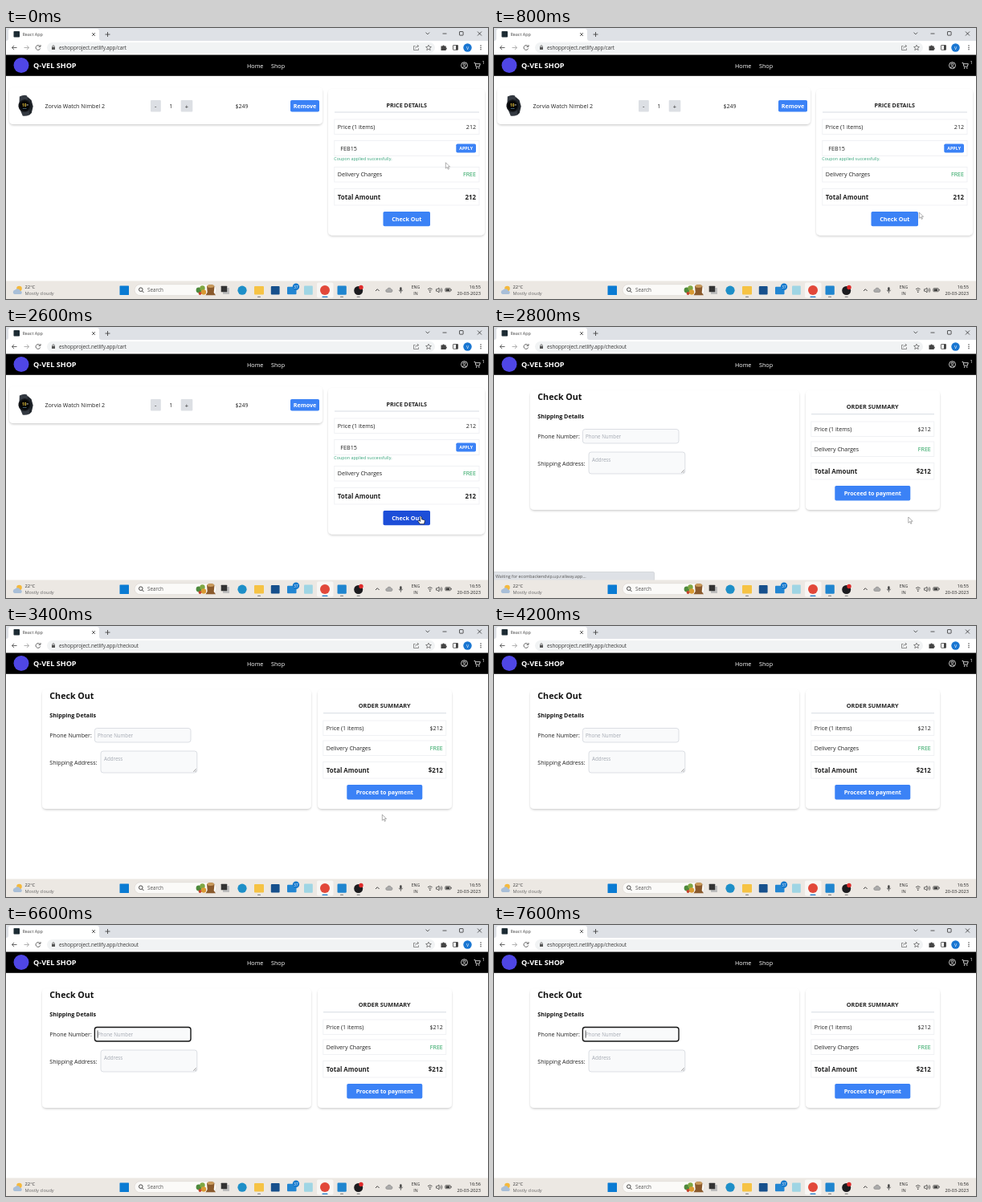
These frames come from a looping animation (600x338 px, 8 s). An HTML page:

```html
<!DOCTYPE html>
<html lang="en">
<head>
<meta charset="utf-8">
<title>Shop checkout</title>
<style>
html, body { margin: 0; width: 100%; height: 100%; overflow: hidden; background: #fff; }
svg { display: block; width: 100vw; height: 100vh; font-family: "Open Sans", "Noto Sans", sans-serif; }
</style>
</head>
<body>
<svg id="stage" viewBox="0 0 600 338" xmlns="http://www.w3.org/2000/svg"></svg>
<script>
const LOOP = 8000;
const BLUE = '#3b82f6', HOVER = '#1d4ed8', INK = '#222', GREEN = '#22a05a';

// Markup helpers
const rect = (x, y, w, h, fill, r = 0, extra = '') =>
  `<rect x="${x}" y="${y}" width="${w}" height="${h}" rx="${r}" fill="${fill}" ${extra}/>`;
const circle = (x, y, r, fill, extra = '') => `<circle cx="${x}" cy="${y}" r="${r}" fill="${fill}" ${extra}/>`;
const line = (d, stroke = '#444', w = 0.8, extra = '') =>
  `<path d="${d}" fill="none" stroke="${stroke}" stroke-width="${w}" ${extra}/>`;
const shape = (d, fill, extra = '') => `<path d="${d}" fill="${fill}" ${extra}/>`;
const text = (s, x, y, size = 7.1, fill = INK, extra = '') =>
  `<text x="${x}" y="${y}" font-size="${size}" fill="${fill}" ${extra}>${s}</text>`;
const BOLD = 'font-weight="700"', MID = 'text-anchor="middle"', END = 'text-anchor="end"';
const group = (id, body) => `<g id="${id}">${body}</g>`;

const card = (x, y, w, h) => rect(x, y, w, h, '#fff', 5, 'filter="url(#shadow)"');
const button = (x, y, w, h, label, size = 7.2, id = '') =>
  rect(x, y, w, h, BLUE, 1.8, id && `id="${id}"`) +
  text(label, x + w / 2, y + h / 2 + size * 0.36, size, '#fff', `${BOLD} ${MID}`);

function row(x, y, w, h, label, value, { size = 7.1, style = '', color = INK } = {}) {
  const base = y + h / 2 + size * 0.37;
  return rect(x, y, w, h, '#fff', 0, 'stroke="#eff0f3" stroke-width=".9"') +
    text(label, x + 4, base, size, INK, style) +
    text(value, x + w - 4, base, size, color, `${END} ${style}`);
}
const total = { size: 7.9, style: BOLD };

function browser() {
  return rect(0, 0, 600, 16, '#dee1e6') +
    shape('M0 16Q3 16 3 13V4Q3 1 6 1H113Q116 1 116 4V13Q116 16 119 16Z', '#fff') +
    rect(9.5, 4, 7.5, 7.5, '#1c2b33', 0.8) +
    text('React App', 20.5, 10.1, 5.4, '#444') +
    line('M107 6l4 4m0-4l-4 4', '#444', 0.8) +
    line('M123.5 8h6m-3-3v6', '#444', 0.9) +
    line('M522.5 5.6l2.3 2.3 2.3-2.3M543.5 7h5M587 4.5l5 5m0-5l-5 5', '#333', 0.8) +
    rect(564.5, 4.5, 4.6, 4.6, 'none', 0.5, 'stroke="#333" stroke-width=".8"') +
    rect(0, 16, 600, 17.5, '#fff') +
    line('M13.5 24.5h-6m2.6-2.6l-2.6 2.6 2.6 2.6', '#555', 0.9) +
    line('M22.5 24.5h6m-2.6-2.6l2.6 2.6-2.6 2.6', '#aaa', 0.9) +
    line('M42.3 22.8a2.9 2.9 0 1 0 .4 2.6M43 21v2.4h-2.4', '#555', 0.9) +
    rect(51, 18, 483, 13, '#f1f3f4', 6.5) +
    rect(57, 23.7, 4, 3.4, '#555', 0.4) + line('M57.8 24v-1.1a1.2 1.2 0 0 1 2.4 0V24', '#555', 0.7) +
    `<text id="url" x="66" y="26.8" font-size="6.25" fill="#333"></text>` +
    line('M509.5 22.5h-2v5h6v-2.2M509.5 25.5q.5-3 4-3m-1.6-1.5l1.8 1.5-1.8 1.6', '#666', 0.7) +
    line('M526 21.2l1 2.2 2.4.2-1.8 1.6.6 2.4-2.2-1.3-2.2 1.3.6-2.4-1.8-1.6 2.4-.2z', '#555', 0.7) +
    shape('M541.5 22.6h2a1.1 1.1 0 0 1 2.2 0h2v2a1.1 1.1 0 0 1 0 2.2v1.2h-6.2z', '#444') +
    rect(556.5, 21.5, 6, 5.8, 'none', 0.4, 'stroke="#444" stroke-width=".8"') + rect(560, 21.5, 2.5, 5.8, '#444') +
    circle(574.5, 24.5, 5.2, '#1976d2') + text('V', 574.5, 26.5, 5.4, '#fff', MID) +
    [22, 24.4, 26.8].map(y => circle(591, y, 0.75, '#444')).join('');
}

function header() {
  return rect(0, 33.5, 600, 26.3, '#000') +
    circle(19, 46.5, 9.5, '#4f46e5') +
    text('Q-VEL SHOP', 34, 50, 9.1, '#fff', BOLD) +
    text('Home', 300, 49.6, 7.2, '#fff') + text('Shop', 330, 49.6, 7.2, '#fff') +
    circle(570.5, 46.7, 4, 'none', 'stroke="#fff" stroke-width=".8"') +
    circle(570.5, 45.5, 1.4, 'none', 'stroke="#fff" stroke-width=".8"') +
    line('M568 49.5q2.5-2.6 5 0', '#fff', 0.8) +
    line('M582.6 43.5h1.4l1 4.6h4.3l1-3.4h-5.8', '#fff', 0.8) +
    circle(585.6, 50, 0.7, '#fff') + circle(588.8, 50, 0.7, '#fff') +
    text('1', 592.4, 45.2, 6, '#fff');
}

function watch() {
  return `<g transform="rotate(-8 24 97)">` +
    shape('M18.5 84.5q5-1.5 9 0l2.5 8v9l-2.5 7.5q-4.500 1.300-8.500 0l-2-8v-8z', '#343a42') +
    shape('M28 86l4.500 5 1 8-3 8-3 2z', '#20252b') +
    circle(23.2, 96.8, 7.8, '#15181c') + circle(23.2, 96.8, 6.2, '#050607') + '</g>' +
    text('10', 20, 98.3, 4.8, '#e8c33a', BOLD) +
    rect(25.8, 95.5, 2, 0.9, '#d7dbe0') + rect(20.8, 100, 4.8, 0.8, '#4a6d86');
}

function cartPage() {
  return card(4, 74, 390, 46) + watch() +
    text('Zorvia Watch Nimbel 2', 48.5, 100.4, 7.1) +
    rect(180, 90, 12.8, 14.5, '#dcdfe4', 1) + rect(217.7, 90, 14.6, 14.5, '#dcdfe4', 1) +
    text('-', 186.2, 100.3, 7.5, INK, MID) + text('1', 205.3, 100.4, 7.1, INK, MID) +
    text('+', 225, 100.6, 7.5, INK, MID) +
    text('$249', 285.5, 100.4, 7) + button(354, 90, 36, 14.5, 'Remove', 7.2) +
    card(401, 76, 195, 182.500) +
    text('PRICE DETAILS', 498.7, 98.6, 7.2, INK, `${BOLD} ${MID}`) +
    line('M409 105H589', '#d3d8e0', 0.9) +
    row(408.8, 114, 180.2, 18.5, 'Price (1 items)', '212') +
    rect(408.8, 140.5, 180.2, 19, '#fff', 0, 'stroke="#eff0f3" stroke-width=".9"') +
    text('FEB15', 416.300, 152.8, 7.2) + button(560.3, 144.500, 24.700, 11, 'APPLY', 5.4) +
    text('Coupon applied successfully.', 408.300, 165.300, 5.4, '#35a37a') +
    row(408.8, 173.5, 180.2, 18.5, 'Delivery Charges', 'FREE', { color: GREEN }) +
    row(408.8, 200.5, 180.2, 20.5, 'Total Amount', '212', total) +
    button(469.500, 229, 58.500, 18.200, 'Check Out', 7.2, 'checkout');
}

function formPage() {
  const field = (x, y, w, h, id) =>
    rect(x, y, w, h, '#f9fafb', 3, `id="${id}" stroke="#d3d7dd" stroke-width=".8"`);
  return card(45, 79, 335, 149) +
    text('Check Out', 54.3, 90.8, 10.7, '#111', BOLD) +
    text('Shipping Details', 54.300, 113.700, 7.2, '#111', BOLD) +
    text('Phone Number:', 54.300, 139.300, 7.1) +
    field(110.400, 127.500, 119.600, 17.500, 'phone') +
    text('Phone Number', 114, 138.900, 6.2, '#a3a8b1') +
    rect(113.700, 131.500, 0.7, 9.300, '#222', 0, 'id="caret"') +
    text('Shipping Address:', 54.300, 172.800, 7.1) +
    field(118, 156, 119.800, 27, 'address') +
    text('Address', 122, 167.900, 6.2, '#a3a8b1') +
    line('M233.200 181.800l3.600-3.600M235.400 181.800l1.400-1.400', '#666', 0.6) +
    card(388, 79, 167, 149) +
    text('ORDER SUMMARY', 471.200, 102.300, 7.350, INK, `${BOLD} ${MID}`) +
    line('M395 108.700H548', '#d3d8e0', 0.9) +
    row(394.800, 118, 153, 18.500, 'Price (1 items)', '$212') +
    row(394.800, 143, 153, 18.500, 'Delivery Charges', 'FREE', { color: GREEN }) +
    row(394.800, 169.500, 153, 20.500, 'Total Amount', '$212', total) +
    button(424.300, 198, 94, 18.500, 'Proceed to payment', 7.1);
}

function taskbar() {
  const under = (x, w = 4, c = '#8a8a8a') => rect(x - w / 2, 334.800, w, 1.2, c, 0.6);
  return rect(0, 315.500, 600, 22.500, '#ece8e3') +
    circle(16.500, 325, 3.300, '#f5b93c') +
    shape('M10.500 332a2.700 2.700 0 0 1 .6-5.200 3.700 3.700 0 0 1 6.600 1 2.200 2.200 0 0 1 .8 4.200z', '#a9bfd8') +
    text('22°C', 23.500, 325.300, 5.800, '#333') + text('Mostly cloudy', 23.500, 332.800, 5.650, '#666') +
    rect(141.500, 321.500, 11.500, 11.500, '#0a7bd3', 0.6) +
    rect(160, 319.700, 102, 14, '#fbfaf8', 7, 'stroke="#d8d4cf" stroke-width=".6"') +
    circle(167.800, 326.200, 2.300, 'none', 'stroke="#333" stroke-width=".9"') + line('M169.500 328l2 2', '#333', 0.9) +
    text('Search', 176, 329.300, 6.300, '#555') +
    // search illustration: foliage beside a stump
    circle(240, 327, 3.400, '#4e8a3c') + circle(244.500, 324.500, 3.200, '#7fa843') +
    circle(246, 329.500, 3.200, '#d99a32') + circle(241.500, 331, 1.900, '#c5432e') +
    shape('M250 322q5-4 9.500 0l-.8 8 2.300 3.200h-12.500l2.200-3.500z', '#8a5a2c') +
    '<ellipse cx="254.700" cy="322" rx="4.300" ry="1.900" fill="#c99a5b"/>' +
    rect(270, 324, 8, 8, '#bdbdbd', 0.5) + rect(267.700, 321.800, 7.500, 7.500, '#333', 0.5) +
    circle(294, 327.200, 5.600, '#1e8fc8') +
    rect(309, 322, 12, 10.500, '#f6c344', 1) + under(315) +
    rect(329.800, 322, 10.800, 10.500, '#17508c', 1) +
    rect(350, 322.800, 11.500, 9.500, '#2386d2', 1) +
    circle(361, 322.700, 4.200, '#1478cd') + text('37', 361, 324.500, 4.600, '#fff', MID) +
    rect(371, 321.500, 10.800, 11.300, '#9fd5e4', 1) +
    rect(387, 317.500, 20.500, 19, '#f8f6f3', 2) + circle(397, 327, 6, '#e2483a') + under(397, 7, '#1672c4') +
    rect(412.500, 321.500, 11.300, 11.300, '#1f85cf', 1.200) + under(418) +
    circle(438.700, 327.500, 5.500, '#1c1c1f') + circle(442, 323.500, 2.700, '#e02b2b') + under(438.700) +
    line('M460 328l2.300-2.300 2.300 2.300', '#333', 0.9) +
    shape('M474.500 329.500a1.800 1.800 0 0 1 0-3.600 2.700 2.700 0 0 1 5-.2 2 2 0 0 1 .3 3.800z', '#aaa', 'stroke="#777" stroke-width=".5"') +
    rect(490.200, 323.200, 2.400, 4.700, '#444', 1.200) + line('M489 326.800q2.400 4 4.800 0M491.400 329v1.800', '#444', 0.7) +
    text('ENG', 510, 325.300, 5.200, INK, MID) + text('IN', 510, 332.700, 5.200, INK, MID) +
    line('M525 325.800q2.800-2.600 5.600 0M526.200 327.500q1.600-1.500 3.200 0', '#333', 0.8) + circle(527.800, 329.300, 0.8, '#333') +
    line('M535.500 325.800h1.500l2-1.800v6l-2-1.800h-1.500zM540.500 325.500q1 1.500 0 3M541.900 324.300q2 2.700 0 5.400', '#333', 0.7) +
    rect(546.800, 324.700, 6.600, 4, 'none', 0.8, 'stroke="#333" stroke-width=".7"') + rect(547.600, 325.500, 4.600, 2.400, '#333') +
    rect(553.800, 325.900, 0.8, 1.600, '#333') +
    `<text id="clock" x="591" y="325.300" font-size="5.600" fill="${INK}" ${END}></text>` +
    text('20-03-2023', 591, 332.700, 5.650, INK, END);
}

const stage = document.getElementById('stage');
stage.innerHTML =
  '<defs><filter id="shadow" x="-5%" y="-10%" width="110%" height="125%">' +
  '<feDropShadow dx="0" dy="1.500" stdDeviation="1.200" flood-color="#000" flood-opacity=".18"/></filter></defs>' +
  rect(0, 0, 600, 338, '#fff') +
  group('cart', cartPage()) + group('form', formPage()) +
  browser() + header() +
  group('status', rect(-2, 305.500, 201.500, 11, '#dee1e6', 1.500, 'stroke="#c6c9ce" stroke-width=".6"') +
    text('Waiting for ecombackendvip.up.railway.app...', 2, 312.700, 5.350, '#555')) +
  taskbar() +
  group('arrow', shape('M0 0V7.300L1.800 5.700 3 8.400 4.200 7.900 3 5.300H5.300Z', '#fff', 'stroke="#777" stroke-width=".6"')) +
  group('hand', shape('M-.9 .5Q0-.7 .9 .5V3.300L4.200 4.200Q5 4.600 4.800 5.600L4 9.300H-1.200L-3.500 5.800Q-3.400 4.500-2.200 5L-.9 6Z',
    '#fff', 'stroke="#111" stroke-width=".7"'));

const el = Object.fromEntries([...stage.querySelectorAll('[id]')].map(n => [n.id, n]));

// Pointer stops: [start, x, y]; each holds until the next
const STOPS = [
  [0, 547.300, 167.800], [200, 541.300, 186], [400, 534.300, 212], [600, 528.500, 233], [800, 529.300, 230],
  [1000, 516.500, 236.500], [2800, 515.800, 237], [3400, 468.300, 235.200], [3600, 238.300, 210], [3800, 152.300, 183]
];
const within = (t, a, b) => t >= a && t < b;
const show = (node, on) => node.setAttribute('visibility', on ? 'visible' : 'hidden');

function draw(t) {
  const form = t >= 2800, hover = within(t, 1000, 2800), focus = t >= 5600;
  el.cart.style.display = form ? 'none' : '';
  el.form.style.display = form ? '' : 'none';
  el.url.textContent = 'eshopproject.netlify.app/' + (form ? 'checkout' : 'cart');
  el.clock.textContent = t < 6600 ? '16:55' : '16:56';
  el.checkout.setAttribute('fill', hover ? HOVER : BLUE);
  show(el.status, within(t, 2800, 3200));

  el.phone.setAttribute('stroke', focus ? '#151515' : '#d3d7dd');
  el.phone.setAttribute('stroke-width', focus ? 1.4 : 0.8);
  show(el.caret, within(t, 5600, 6000) || within(t, 6600, 7000) || t >= 7600);

  const [, x, y] = STOPS.filter(s => s[0] <= t).pop();
  const pointer = hover ? el.hand : el.arrow;
  pointer.setAttribute('transform', `translate(${x} ${y})`);
  show(el.hand, hover);
  show(el.arrow, !hover && t < 4000);
}

const start = performance.now();
function tick() {
  draw((performance.now() - start) % LOOP);
  requestAnimationFrame(tick);
}
tick();
</script>
</body>
</html>
```
